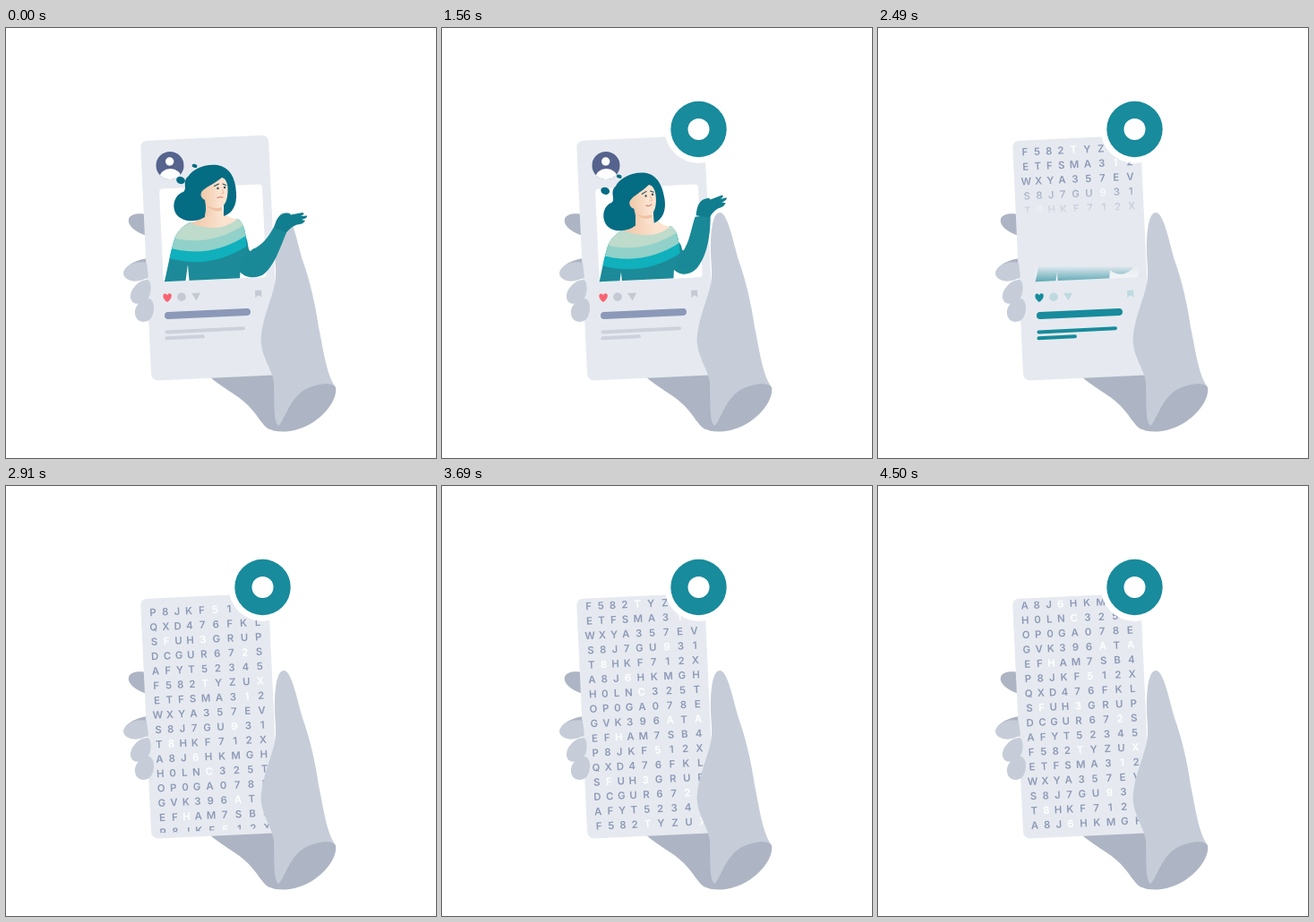
An HTML page for the animation above (4.53 s loop, 480x480 px).

```html
<!DOCTYPE html>
<html lang="en">
<head>
<meta charset="utf-8">
<title>Encrypted phone</title>
<style>
html, body { margin: 0; width: 100%; height: 100%; overflow: hidden; background: #fff; }
svg { display: block; width: 100vw; height: 100vh; }
#rows { font: 600 11.4px Inter, "Open Sans", sans-serif; text-anchor: middle; fill: #8d99b6; }
#rows .hot { fill: #fff; }
</style>
</head>
<body>
<svg viewBox="0 0 480 480">
  <defs>
    <linearGradient id="wipe" gradientUnits="userSpaceOnUse" x1="0" x2="0">
      <stop stop-color="#000"/><stop offset="1" stop-color="#fff"/>
    </linearGradient>
    <linearGradient id="reveal" gradientUnits="userSpaceOnUse" x1="0" x2="0">
      <stop stop-color="#fff"/><stop offset="1" stop-color="#000"/>
    </linearGradient>
    <linearGradient id="skin">
      <stop stop-color="#f0c6a6"/><stop offset=".7" stop-color="#fbe3d0"/>
    </linearGradient>
    <mask id="wipeMask" maskUnits="userSpaceOnUse" x="0" y="0" width="480" height="480">
      <rect width="480" height="480" fill="url(#wipe)"/>
    </mask>
    <mask id="revealMask" maskUnits="userSpaceOnUse" x="0" y="0" width="480" height="480">
      <rect width="480" height="480" fill="url(#reveal)"/>
    </mask>
    <clipPath id="screen"><rect x="3" y="4" width="138" height="258"/></clipPath>
    <clipPath id="frame"><path d="M0 0H480V269L0 291.6Z"/></clipPath>
    <clipPath id="avatar"><circle cx="183" cy="153.500" r="15.500"/></clipPath>
    <clipPath id="sweater">
      <path id="sweaterShape" d="M189 233C194 224 201 218 207 217Q236 226 258 213C264 216 267 224 268 236L269 248L262 262L260 300H206L203 264L198 300H173C181 268 183 250 189 233Z"/>
    </clipPath>
  </defs>

  <!-- back of the hand -->
  <g fill="#adb5c4">
    <path d="M226 388C240 401 258 409 270 421C281 432 286 444 294 448L310 446V380Z"/>
    <path d="M160 209C150 206 139 207 137 213C135 221 146 229 160 233Z"/>
    <path d="M162 257C150 257 136 263 133 270L162 282Z"/>
  </g>

  <g transform="translate(150 126) rotate(-2.65)">
    <rect width="143" height="268" rx="7" fill="#e6eaf0"/>
  </g>
  <g mask="url(#revealMask)">
    <g transform="translate(150 126) rotate(-2.65)">
      <g clip-path="url(#screen)"><g id="rows"></g></g>
    </g>
  </g>

  <!-- thumb, palm and fingers -->
  <g fill="#c6cdd9">
    <path d="M311 206C304 205 301 218 300 238C299 258 303 272 300 286C296 304 286 325 284.500 347C285 368 297 380 299 396C300 412 298 432 304 444L330 438L367 400C357 384 354 357 349 334C345 307 339 281 331 259C325 238 319 208 311 206Z"/>
    <path d="M157 262C145 259 131 266 131 274C132 283 147 286 159 278Z"/>
    <path d="M158 281C148 281 138 292 139 301C140 309 150 310 157 304C163 298 163 283 158 281Z"/>
    <path d="M159 302C150 303 143 311 144 319C145 328 154 330 160 326C167 320 167 303 159 302Z"/>
  </g>
  <path d="M293 447C302 453 325 452 343 440C360 429 370 412 368 401C365 395 347 396 333 404C316 414 311 438 304 444C300 437 300 428 300 420Q288 438 293 447Z" fill="#adb5c4"/>
  <path d="M299 396C301 414 297 436 304 444C311 438 316 414 333 404L320 392Z" fill="#c6cdd9"/>

  <g mask="url(#wipeMask)">
    <g transform="translate(150 126) rotate(-2.65)">
      <rect x="18.500" y="54.500" width="115" height="104" rx="4" fill="#fff"/>
    </g>
    <circle cx="183" cy="153.500" r="15.500" fill="#55638d"/>
    <g clip-path="url(#avatar)" fill="#fff">
      <circle cx="182.700" cy="149" r="4.700"/>
      <ellipse cx="183.500" cy="167" rx="12" ry="10"/>
    </g>

    <g id="heart"><path d="M180 306C174 302 174.500 296.500 177.500 296.500Q179.500 296.500 180 298.500Q180.500 296.300 182.500 296.300C186 296.300 186 302 180 306Z"/></g>
    <g id="icons">
      <circle cx="196" cy="300.200" r="4.800"/>
      <path d="M207 296L217 295.500L212.700 304.500Z"/>
      <path d="M278 293L285 292.600L285.400 300.600L282 298.300L278.400 301Z"/>
    </g>
    <g id="bar"><path d="M181 321L269 317" stroke-width="8" stroke-linecap="round"/></g>
    <g id="lines" stroke-width="4" stroke-linecap="round"><path d="M179.500 339.500L265 335.200M179.500 346.300L220 344.300"/></g>

    <g clip-path="url(#frame)">
      <path id="arm" fill="#1a8997"/>
      <g id="torso">
        <use href="#sweaterShape" fill="#1c8a98"/>
        <g id="bands" clip-path="url(#sweater)"></g>
        <path d="M206 218Q222 213 223 202L242 200Q242 211 258 213.500Q238 230 206 218Z" fill="url(#skin)"/>
      </g>
      <g id="head">
        <path d="M236 153C222 151 208 158 204 165C196 171 203 179 198 183C186 187 185 202 191 209C198 217 213 217 222 211L224 196L243 196V210C253 207 258 197 257 184C256 166 249 155 236 153Z" fill="#046c83"/>
        <path d="M241 167C234 173 226 176 220 181C216 184 217 190 222 192C223 198 224 204 222 210L240 211L241 200C246 196 248 188 247.500 178C247 172 245 168 241 167Z" fill="url(#skin)"/>
        <path d="M224 198Q233 203 241 200L240.500 204Q230 206 224 198Z" fill="#efc3a3"/>
        <g fill="none" stroke="#24505e" stroke-width="1.100" stroke-linecap="round">
          <path d="M232.500 176.500L237.500 174M242 174L245.500 175.500"/>
          <path id="mouth" stroke="#cf7d6d"/>
          <path d="M241.500 180L243 184.500L240.500 185" stroke="#e5b294" stroke-width=".8"/>
        </g>
        <g fill="#24505e"><circle cx="236.500" cy="179" r="1.200"/><circle cx="244" cy="178" r="1.200"/></g>
      </g>
      <g id="drops" fill="#046c83">
        <ellipse cx="195" cy="170" rx="5" ry="4" transform="rotate(20 195 170)"/>
        <ellipse cx="210.500" cy="153.700" rx="2.900" ry="2" transform="rotate(20 210 154)"/>
      </g>
      <path id="hand" fill="#107e8e" d="M299 223C302 212 306 207 313 206.500Q317 206 318 208.500L331 206Q335 207 329 210L336 209.500Q337 212 330 214L334 215Q332 219 325 219.500C320 221 317 224 313 228Z"/>
    </g>
  </g>

  <g id="badge">
    <circle r="38" fill="#fff"/>
    <circle r="31.200" fill="#188b9c"/>
    <circle r="12" fill="#fff"/>
  </g>
</svg>
<script>
const LOOP = 4530, PITCH = 16.38, SPEED = 0.2012;
const $ = id => document.getElementById(id);
const COLS = [13.3, 27, 40.2, 53.4, 67.8, 82.8, 98.4, 113.8, 129.6].join(" ");

// Each row: text, then the columns shown in white
const ROWS = [
  ["P8JKF512X", 5], ["QXD476FKL"], ["SFUH3GRUP", 1, 4], ["DCGUR672S", 7], ["AFYT52345"],
  ["F582TYZUX", 4, 8], ["ETFSMA312", 7], ["WXYA357EV"], ["S8J7GU931", 6], ["T8HKF712X", 1],
  ["A8J6HKMGH", 3], ["H0LNC325T", 4], ["OP0GA078E"], ["GVK396ATA", 6, 8], ["EFHAM7SB4", 2]
];
const SPAN = PITCH * ROWS.length;

let markup = "";
for (let i = 0; i < ROWS.length * 2 + 3; i++) {
  const [text, ...hot] = ROWS[i % ROWS.length];
  const chars = [...text].map((c, n) => hot.includes(n) ? `<tspan class="hot">${c}</tspan>` : c);
  markup += `<text x="${COLS}" y="${(i * PITCH).toFixed(2)}">${chars.join("")}</text>`;
}
$("rows").innerHTML = markup;

// Sweater stripes, lowest first: left, middle and right height, colour
$("bands").innerHTML = [
  [249, 284, 218, "#10b0bd"], [237, 273, 205, "#91d1c9"], [224, 262, 190, "#bedbcb"]
].map(([l, m, r, c]) => `<path d="M160 180H300V${r}Q235 ${m} 160 ${l}Z" fill="${c}"/>`).join("");

const ARM_DOWN = "M256 232C262 226 269 230 270 242C271 248 272 251 275 247C286 243 294 232 299 222L314 226C305 248 299 267 286 276C273 282 262 276 258 268Z";
const ARM_UP = "M254 240C260 234 267 238 268 247C269 249 270 249 272 244C277 236 279 222 283 211L300 209C300 232 296 256 284 269C274 278 264 276 256 267Z";
const upNums = ARM_UP.match(/\d+/g);

const mix = (a, b, k) => a + (b - a) * k;
const ease = k => k * k * (3 - 2 * k);
function key(t, steps) {
  if (t <= steps[0][0]) return steps[0][1];
  for (let i = 1; i < steps.length; i++) {
    const [t0, v0] = steps[i - 1], [t1, v1] = steps[i];
    if (t < t1) return mix(v0, v1, ease((t - t0) / (t1 - t0)));
  }
  return steps[steps.length - 1][1];
}
function mixPath(k) {
  let i = 0;
  return ARM_DOWN.replace(/\d+/g, n => mix(+n, +upNums[i++], k).toFixed(2));
}
const move = (id, x, y, extra = "") => $(id).setAttribute("transform", `translate(${x} ${y}) ${extra}`);
function edge(id, y1, y2) {
  $(id).setAttribute("y1", y1);
  $(id).setAttribute("y2", y2);
}

const TEAL = [24, 139, 156];
const TINTS = [
  ["heart", "fill", [250, 98, 113], TEAL],
  ["icons", "fill", [196, 201, 211], [190, 218, 224]],
  ["bar", "stroke", [139, 152, 184], TEAL],
  ["lines", "stroke", [204, 209, 219], TEAL]
];

const POSE = [[0, 0], [900, 1], [2200, 1.05]];
const POP = [[400, 0], [1080, 1.17], [1530, 1]];
const TINT = [[2190, 0], [2440, 1]];

function draw(t) {
  const k = key(t, POSE);
  move("head", -6 * k, 8.5 * k, `rotate(${-5 * k} 232 210)`);
  move("drops", -12.5 * k, 11.5 * k);
  move("torso", -3 * k, 8 * k);
  move("hand", -15 * k, -15 * k, `rotate(${-10 * k} 308 224)`);
  $("mouth").setAttribute("d", `M236 189.5Q239 ${188.3 + 3.5 * k} 242 189`);
  $("arm").setAttribute("d", mixPath(k));

  move("badge", 286.5, 113, `scale(${key(t, POP)})`);

  const tint = key(t, TINT);
  for (const [id, prop, from, to] of TINTS)
    $(id).setAttribute(prop, `rgb(${from.map((v, i) => Math.round(mix(v, to[i], tint)))})`);

  const sweep = 277 + 0.55 * (t - 2490);
  edge("wipe", sweep - 12, sweep + 14);
  edge("reveal", sweep - 107, sweep - 65);

  const shift = -65 + SPEED * (t - 2490);
  move("rows", 0, ((shift % SPAN) + SPAN) % SPAN - SPAN);
}

const start = performance.now();
function tick() {
  draw((performance.now() - start) % LOOP);
  requestAnimationFrame(tick);
}
tick();
</script>
</body>
</html>
```
